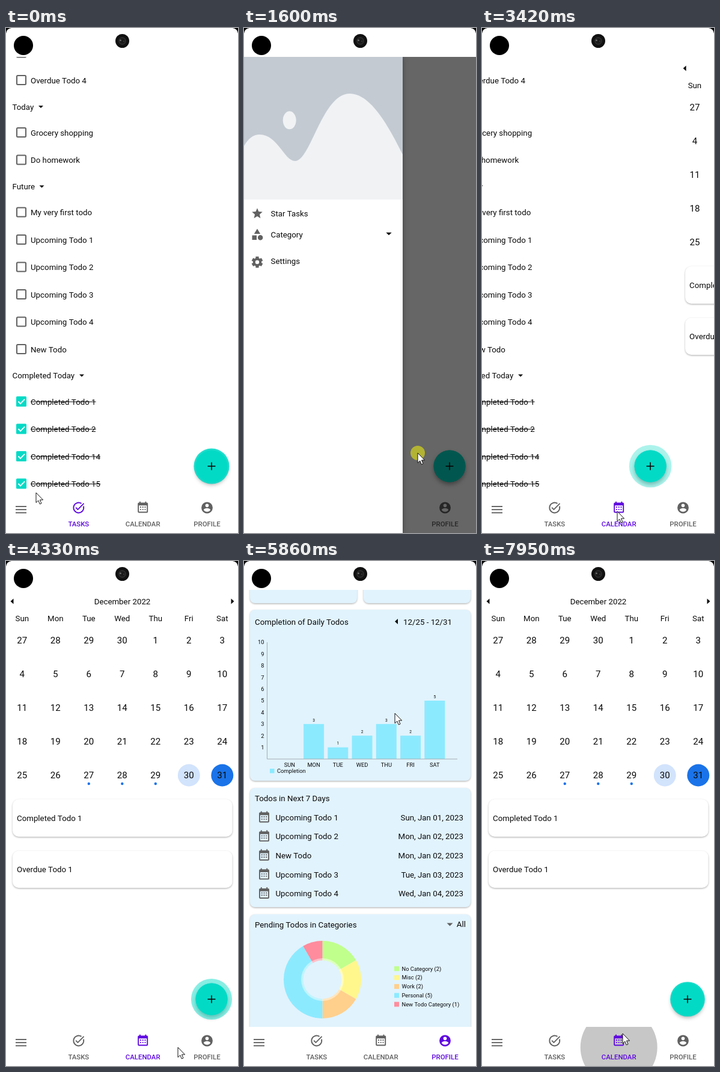
An HTML page with a canvas for the animation above (8 s loop, 386 by 839 pixels).

```html
<!DOCTYPE html>
<html lang="en">
<head>
<meta charset="utf-8">
<title>Todo app walkthrough</title>
<style>
html, body { margin: 0; width: 100%; height: 100%; overflow: hidden; background: #fff; }
canvas { display: block; width: 386px; height: 839px; }
</style>
</head>
<body>
<canvas id="stage"></canvas>
<script>
const W = 386, H = 839, LOOP = 8000, TOP = 48, NAV = 774, PITCH = 389;
const canvas = document.getElementById('stage');
const ctx = canvas.getContext('2d');
const ratio = window.devicePixelRatio || 1;
canvas.width = W * ratio;
canvas.height = H * ratio;

const TEAL = '#03dac6', PURPLE = '#5f0ae0', GREY = '#616161', CARD = '#e1f3fd', SKY = '#8ceaff';

const ICONS = {
  calendar: 'M9 10V12H7V10H9M13 10V12H11V10H13M17 10V12H15V10H17M19 3A2 2 0 0 1 21 5V19A2 2 0 0 1 19 21H5C3.9 21 3 20.1 3 19V5A2 2 0 0 1 5 3H6V1H8V3H16V1H18V3H19M19 19V8H5V19H19M9 14V16H7V14H9M13 14V16H11V14H13M17 14V16H15V14H17Z',
  tasks: 'M22 5.2 10.6 16.6 6.35 12.35 7.75 10.95 10.6 13.8 20.6 3.8ZM19.8 10.2A8 8 0 1 1 16.3 5.25L17.7 3.8A10 10 0 1 0 21.4 8.6Z',
  profile: 'M12 2A10 10 0 1 0 12 22A10 10 0 1 0 12 2ZM12 5A3 3 0 1 1 12 11A3 3 0 1 1 12 5ZM12 19.2C9.5 19.2 7.3 17.9 6 16C6 14 10 12.9 12 12.9S18 14 18 16C16.7 17.9 14.5 19.2 12 19.2Z',
  star: 'M12 17.3 18.2 21 16.5 14 22 9.2 14.8 8.6 12 2 9.2 8.6 2 9.2 7.5 14 5.8 21Z',
  shapes: 'M12 2 6.5 11H17.5ZM17.5 13A4.5 4.5 0 1 1 17.5 22A4.5 4.5 0 1 1 17.5 13ZM3 13.5H11V21.5H3Z'
};
for (const name in ICONS) ICONS[name] = new Path2D(ICONS[name]);
const WAVES = new Path2D('M0 196C7 184 15 177 26 177C56 177 67 221 85 221C111 221 130 109 176 109C211 109 241 164 264 210V285H0Z');
const ARROW = new Path2D('M0 0V16.5L3.8 13L6.3 19L9 17.8L6.5 12H11.6Z');

const clamp = v => Math.max(0, Math.min(1, v));
const smooth = v => v * v * (3 - 2 * v);
const ramp = (t, start, length) => smooth(clamp((t - start) / length));
const glide = (t, start, length) => 1 - (1 - clamp((t - start) / length)) ** 3;
const mix = (a, b, k) => a + (b - a) * k;

// y is the middle of the capital letters
function text(str, x, y, { size = 13.3, align = 'left', color = '#0a0a0a', weight = 400 } = {}) {
  ctx.font = `${weight} ${size}px Roboto, sans-serif`;
  ctx.textAlign = align;
  ctx.fillStyle = color;
  ctx.fillText(str, x, y + size * 0.356);
}
function rect(x, y, w, h, color) {
  ctx.fillStyle = color;
  ctx.fillRect(x, y, w, h);
}
function disc(x, y, r, color, ry = r) {
  ctx.beginPath();
  ctx.ellipse(x, y, r, ry, 0, 0, Math.PI * 2);
  ctx.fillStyle = color;
  ctx.fill();
}
function shape(points, color) {
  ctx.beginPath();
  points.forEach(([x, y]) => ctx.lineTo(x, y));
  ctx.closePath();
  ctx.fillStyle = color;
  ctx.fill();
}
function line(points, color, width) {
  ctx.beginPath();
  points.forEach(([x, y]) => ctx.lineTo(x, y));
  ctx.strokeStyle = color;
  ctx.lineWidth = width;
  ctx.stroke();
}
function icon(name, x, y, color = GREY, size = 22.6) {
  ctx.save();
  ctx.translate(x - size / 2, y - size / 2);
  ctx.scale(size / 24, size / 24);
  ctx.fillStyle = color;
  ctx.fill(ICONS[name], 'evenodd');
  ctx.restore();
}
function withShadow(blur, dy, alpha, draw) {
  ctx.save();
  ctx.shadowColor = `rgba(0,0,0,${alpha})`;
  ctx.shadowBlur = blur * ratio;
  ctx.shadowOffsetY = dy * ratio;
  draw();
  ctx.restore();
}
function card(x, y, right, bottom, color, r = 8) {
  withShadow(3, 1.2, 0.3, () => {
    ctx.beginPath();
    ctx.roundRect(x, y, right - x, bottom - y, r);
    ctx.fillStyle = color;
    ctx.fill();
  });
}
const caretDown = (x, y, half = 4, color = '#0a0a0a') =>
  shape([[x - half, y - half / 2], [x + half, y - half / 2], [x, y + half / 2]], color);
const caretSide = (x, y, dir) => shape([[x + 2.5 * dir, y], [x - 2.5 * dir, y - 4.5], [x - 2.5 * dir, y + 4.5]], '#0a0a0a');
function clipped(x, y, w, h, draw) {
  ctx.save();
  ctx.beginPath();
  ctx.rect(x, y, w, h);
  ctx.clip();
  draw();
  ctx.restore();
}

function checkbox(y, checked) {
  ctx.beginPath();
  ctx.roundRect(checked ? 17 : 18, y - (checked ? 8.5 : 7.5), checked ? 17 : 15, checked ? 17 : 15, 1.5);
  if (checked) {
    ctx.fillStyle = TEAL;
    ctx.fill();
    line([[20.5, y], [24, y + 3.7], [31, y - 3.6]], '#fff', 1.9);
  } else {
    ctx.strokeStyle = GREY;
    ctx.lineWidth = 2;
    ctx.stroke();
  }
}
function todo(label, y, done) {
  checkbox(y, done);
  text(label, 41, y + 0.5);
  if (done) rect(41, y, ctx.measureText(label).width, 1, '#0a0a0a');
}
function heading(label, y, caretX) {
  text(label, 10.5, y);
  caretDown(caretX, y);
}

function addButton(t) {
  const p = (t / 1000 + 0.22) % 1;
  const x = 342, y = 728;
  withShadow(7, 4, 0.35, () => disc(x, y, 26.5, TEAL));
  ctx.globalAlpha = Math.max(0, 1 - (p / 0.82) ** 1.6);
  disc(x, y, 26.5 + 13.8 * p, TEAL);
  ctx.globalAlpha = 1;
  disc(x, y, 26.5, TEAL);
  rect(x - 6.5, y - 0.8, 13, 1.6, '#0a0a0a');
  rect(x - 0.8, y - 6.5, 1.6, 13, '#0a0a0a');
}

function tasksPage(t) {
  checkbox(41, false);
  todo('Overdue Todo 4', 86.5);
  heading('Today', 131, 58);
  ['Grocery shopping', 'Do homework'].forEach((s, i) => todo(s, 173.5 + 45.5 * i));
  heading('Future', 263.5, 59.5);
  ['My very first todo', 'Upcoming Todo 1', 'Upcoming Todo 2', 'Upcoming Todo 3', 'Upcoming Todo 4', 'New Todo']
    .forEach((s, i) => todo(s, 306 + 45.5 * i));
  heading('Completed Today', 577.5, 126);
  [1, 2, 14, 15].forEach((n, i) => todo('Completed Todo ' + n, 620.5 + 45.5 * i, true));
  addButton(t);
}

function calendarPage(t) {
  const center = { align: 'center' };
  caretSide(10, 67, -1);
  caretSide(377, 67, 1);
  text('December 2022', 193.5, 67.5, center);
  const column = i => 26.8 + 55.5 * i;
  ['Sun', 'Mon', 'Tue', 'Wed', 'Thu', 'Fri', 'Sat'].forEach((s, i) => text(s, column(i), 95.5, center));
  disc(column(5), 356, 18.5, '#d2e3fc');
  disc(column(6), 356, 18.5, '#1a73e8');
  for (let i = 0; i < 35; i++) {
    const day = i < 4 ? 27 + i : i - 3;
    text(String(day), column(i % 7), 132 + 56 * Math.floor(i / 7), { align: 'center', size: 15.1 });
  }
  for (const i of [2, 3, 4]) disc(column(i), 370, 2.2, '#1a73e8');
  card(11, 396, 376.5, 458, '#fff', 10);
  card(11, 481.5, 376.5, 543, '#fff', 10);
  text('Completed Todo 1', 18, 427);
  text('Overdue Todo 1', 18, 512.5);
  addButton(t);
}

function avatar() {
  clipped(10.5, 52, 47.5, 47, () => {
    rect(10, 52, 48, 47, '#75685a');
    rect(10, 86, 48, 13, '#564b40');
    shape([[19, 53], [27, 61], [40, 61], [48, 53], [50, 76], [44, 99], [22, 99], [17, 76]], '#302c2a');
    disc(34, 82, 9, '#a39a90', 6);
  });
}

function barChart() {
  text('Completion of Daily Todos', 18, 274);
  caretSide(253.5, 273.5, -1);
  text('12/25 - 12/31', 265, 274);
  const base = 502, unit = 19.4, small = 9.3;
  for (let n = 1; n <= 10; n++) text(String(n), 33.5, base - unit * n, { size: small, align: 'right' });
  const values = [0, 3, 1, 2, 3, 2, 5];
  ['SUN', 'MON', 'TUE', 'WED', 'THU', 'FRI', 'SAT'].forEach((day, i) => {
    const x = 75.8 + 40.25 * i, top = base - unit * values[i];
    if (values[i]) {
      rect(x - 17, top, 34, base - top, SKY);
      text(String(values[i]), x, top - 6.5, { size: 6.6, align: 'center' });
    }
    text(day, x, 511.5, { size: small, align: 'center' });
  });
  line([[38.5, 308], [38.5, base], [355, base]], '#a3adb3', 1);
  rect(43, 518, 7.5, 7.5, SKY);
  text('Completion', 55, 522, { size: small });
}

function donut() {
  const slices = [
    ['No Category', 2, '#c0ff8c'], ['Misc', 2, '#fff78c'], ['Work', 2, '#ffd08c'],
    ['Personal', 5, SKY], ['New Todo Category', 1, '#ff8c9d']
  ];
  const x = 130.5, y = 868.5;
  let angle = -Math.PI / 2;
  slices.forEach(([name, count, color], i) => {
    const next = angle + count * Math.PI / 6;
    ctx.beginPath();
    ctx.moveTo(x, y);
    ctx.arc(x, y, 64.5, angle, next);
    ctx.fillStyle = color;
    ctx.fill();
    angle = next;
    const rowY = 850.3 + 14.8 * i;
    rect(250, rowY - 4, 8, 8, color);
    text(`${name} (${count})`, 262.5, rowY, { size: 9.35 });
  });
  disc(x, y, 35.5, 'rgba(255,255,255,.45)');
  disc(x, y, 32, CARD);
}

function profilePage(scroll) {
  ctx.translate(0, -173 * scroll);
  avatar();
  text('Username', 72.5, 76.5);
  text('Todos Overview', 10.5, 128.5, { weight: 700 });
  [[10, '16', 'Completed Todos'], [199, '12', 'Pending Todos']].forEach(([x, count, label]) => {
    card(x, 149, x + 178, 243, CARD);
    text(count, x + 89, 181.5, { align: 'center', weight: 700 });
    text(label, x + 89, 211.5, { align: 'center' });
  });
  card(10, 254, 377, 538, CARD);
  barChart();
  card(10, 550, 377, 748, CARD);
  text('Todos in Next 7 Days', 18, 567.5);
  [
    ['Upcoming Todo 1', 'Sun, Jan 01, 2023'], ['Upcoming Todo 2', 'Mon, Jan 02, 2023'],
    ['New Todo', 'Mon, Jan 02, 2023'], ['Upcoming Todo 3', 'Tue, Jan 03, 2023'],
    ['Upcoming Todo 4', 'Wed, Jan 04, 2023']
  ].forEach(([label, date], i) => {
    const y = mix(604, 599, scroll) + mix(30.6, 31.6, scroll) * i;
    icon('calendar', 33.5, y);
    text(label, 52.5, y);
    text(date, 365, y, { align: 'right' });
  });
  card(10, 760, 377, 970, CARD);
  text('Pending Todos in Categories', 18, 777.5);
  caretDown(342.5, 777, 5, GREY);
  text('All', 369, 776, { align: 'right' });
  donut();
}

// [start, from page, to page]
const SLIDES = [[3320, 0, 1], [4450, 1, 2], [7450, 2, 1]];
const TABS = [['tasks', 'TASKS', 120.8], ['calendar', 'CALENDAR', 227.7], ['profile', 'PROFILE', 334.5]];

function navBar(t, slide) {
  rect(0, NAV, W, H - NAV, '#fff');
  if (slide) {
    const age = t - slide[0] - 150;
    const alpha = 0.22 * (1 - clamp((age - 370) / 200));
    if (age > 0 && alpha > 0) {
      clipped(0, NAV, W, H - NAV, () =>
        disc(TABS[slide[2]][2], 808, 64 * glide(age, 0, 260), `rgba(0,0,0,${alpha})`));
    }
  }
  const active = slide ? slide[2] : 0;
  for (let i = 0; i < 3; i++) rect(16, 794 + 5.2 * i, 18, 1.9, GREY);
  TABS.forEach(([name, label, x], i) => {
    const color = i === active ? PURPLE : GREY;
    icon(name, x, 797, color);
    text(label, x, 824, { size: 11.4, align: 'center', weight: 500, color });
  });
}

function gear(x, y) {
  ctx.strokeStyle = ctx.fillStyle = GREY;
  ctx.beginPath();
  ctx.arc(x, y, 5.2, 0, Math.PI * 2);
  ctx.lineWidth = 4;
  ctx.stroke();
  for (let i = 0; i < 6; i++) {
    ctx.save();
    ctx.translate(x, y);
    ctx.rotate(i * Math.PI / 3);
    ctx.fillRect(-2.6, -9.3, 5.2, 4);
    ctx.restore();
  }
}

function drawer(open) {
  if (open <= 0) return;
  rect(0, TOP, W, H - TOP, `rgba(0,0,0,${0.6 * open})`);
  clipped(0, TOP, W, H - TOP, () => {
    ctx.translate(-264 * (1 - open), 0);
    withShadow(8, 0, 0.35, () => rect(0, TOP, 264, H - TOP, '#fff'));
    rect(0, TOP, 264, 237, '#c3cad2');
    ctx.fillStyle = '#f0f2f4';
    ctx.fill(WAVES);
    disc(75.7, 153.3, 11, '#f0f2f4', 15);
    icon('star', 22, 308, GREY, 21);
    icon('shapes', 22, 343);
    gear(22, 389);
    text('Star Tasks', 44.5, 308.5);
    text('Category', 44.5, 343);
    text('Settings', 44.5, 387.5);
    caretDown(241, 342, 4.7);
  });
}

function statusBar() {
  rect(0, 0, W, TOP, '#fff');
  for (const side of [0, 1]) {
    ctx.save();
    if (side) { ctx.translate(W, 0); ctx.scale(-1, 1); }
    ctx.beginPath();
    ctx.moveTo(0, 0);
    ctx.lineTo(9, 0);
    ctx.quadraticCurveTo(1, 1, 0, 9);
    ctx.fillStyle = '#000';
    ctx.fill();
    ctx.restore();
  }
  disc(29, 29, 16, '#000');
  disc(193.5, 21.5, 11.5, '#111');
  disc(193.5, 21.5, 6.5, '#2b2b2b');
  disc(193.5, 21.5, 4.5, '#1a1a1a');
  disc(190.5, 20.5, 1.3, '#777');
  disc(196, 22, 0.8, '#555');
}

// [time, x, y]
const POINTER = [
  [0, 50, 772], [300, 36, 802], [950, 36, 802], [1450, 289, 706], [1800, 289, 706],
  [2520, 225, 803], [3620, 225, 803], [4250, 286, 808], [5170, 286, 808], [5520, 251, 253],
  [6350, 251, 253], [7100, 232, 804], [7700, 232, 804], [7930, 234, 785], [LOOP, 234, 785]
];
const CLICKS = [430, 1560, 3180, 4340, 7350];

function pointer(t) {
  const i = POINTER.findIndex(p => p[0] > t);
  const [t0, x0, y0] = POINTER[i - 1], [t1, x1, y1] = POINTER[i];
  const k = ramp(t, t0, t1 - t0);
  const x = mix(x0, x1, k), y = mix(y0, y1, k);
  if (CLICKS.some(c => t >= c && t < c + 110)) disc(x, y, 12, 'rgba(255,255,0,.5)');
  ctx.save();
  ctx.translate(x, y);
  ctx.fillStyle = '#fff';
  ctx.strokeStyle = '#111';
  ctx.lineWidth = 1;
  ctx.fill(ARROW);
  ctx.stroke(ARROW);
  ctx.restore();
}

function render(t) {
  ctx.setTransform(ratio, 0, 0, ratio, 0, 0);
  rect(0, 0, W, H, '#fff');
  const slide = SLIDES.filter(s => s[0] <= t).pop();
  const page = slide ? mix(slide[1], slide[2], ramp(t, slide[0], 400)) : 0;
  const scroll = ramp(t, 5480, 370) - glide(t, 6150, 800);
  clipped(0, TOP, W, NAV - TOP, () => {
    [tasksPage, calendarPage, profilePage].forEach((draw, i) => {
      if (Math.abs(i - page) >= 1) return;
      ctx.save();
      ctx.translate((i - page) * PITCH, 0);
      draw(i === 2 ? scroll : t);
      ctx.restore();
    });
  });
  navBar(t, slide);
  drawer(ramp(t, 600, 300) - ramp(t, 1660, 300));
  statusBar();
  pointer(t);
}

const began = performance.now();
function frame() {
  render((performance.now() - began) % LOOP);
  requestAnimationFrame(frame);
}
frame();
</script>
</body>
</html>
```
